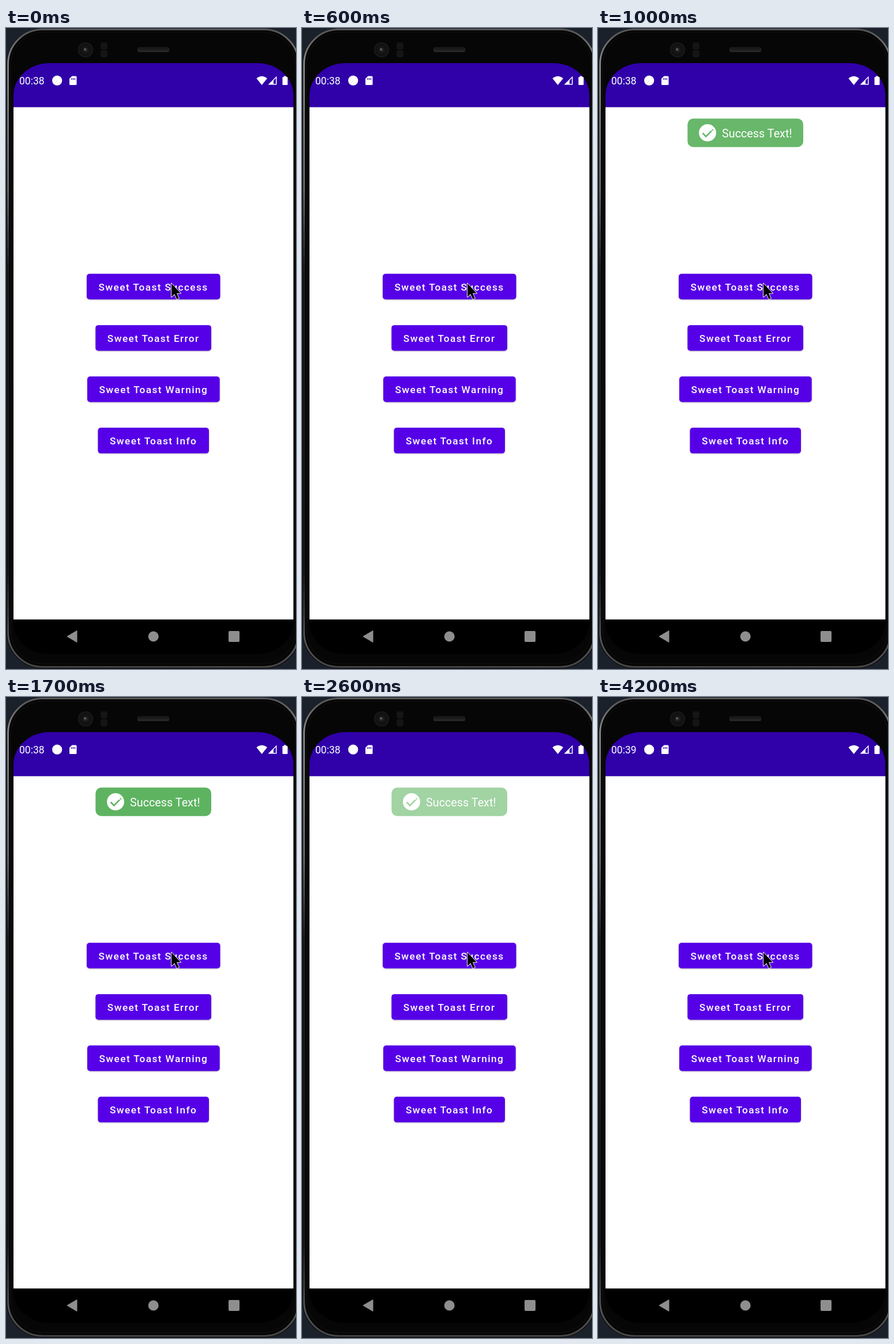
Write an HTML page that moves like this. It is 503 px wide and 1113 px high and loops after 4.8 s.

```html
<!DOCTYPE html>
<html lang="en">
<head>
<meta charset="utf-8">
<title>Toast demo</title>
<style>
  html, body { margin: 0; width: 100%; height: 100%; overflow: hidden; background: #1b212b; }
  svg { display: block; width: 503px; height: 1113px; font-family: Roboto, sans-serif; }
  text { fill: #fff; white-space: pre; }
  .button rect { fill: #5600e8; filter: drop-shadow(0 1.5px 1.2px #0004); }
  .button text { font-size: 17.3px; font-weight: 500; letter-spacing: 1.4px; }
</style>
</head>
<body>
<svg viewBox="0 0 503 1113">
  <defs>
    <linearGradient id="rim" x2="0" y2="1">
      <stop offset="0" stop-color="#555"/>
      <stop offset=".05" stop-color="#858585"/>
      <stop offset=".25" stop-color="#696969"/>
      <stop offset=".38" stop-color="#1c1c1c"/>
      <stop offset=".85" stop-color="#181818"/>
      <stop offset=".96" stop-color="#555"/>
      <stop offset="1" stop-color="#444"/>
    </linearGradient>
    <linearGradient id="grille" x2="0" y2="1">
      <stop stop-color="#111"/>
      <stop offset="1" stop-color="#2b2b2b"/>
    </linearGradient>
    <radialGradient id="lens">
      <stop stop-color="#39393d"/>
      <stop offset=".35" stop-color="#161618"/>
      <stop offset=".8" stop-color="#101011"/>
      <stop offset="1" stop-color="#202020"/>
    </radialGradient>
    <clipPath id="screen"><rect x="13" y="61" width="485.5" height="1026" rx="62" ry="56"/></clipPath>
  </defs>

  <!-- phone body -->
  <rect x="1" y="1" width="509" height="1111" rx="62" fill="#050505"/>
  <rect x="3.5" y="2.5" width="504" height="1107" rx="60" fill="#060606" stroke="url(#rim)" stroke-width="3"/>
  <rect x="8" y="7" width="495" height="1097" rx="58" fill="#070606" stroke="#141313"/>
  <circle cx="138" cy="38" r="13" fill="url(#lens)"/>
  <circle cx="137" cy="37" r="2" fill="#5b5b60"/>
  <rect x="164" y="25" width="12" height="12" rx="4" fill="#161515"/>
  <rect x="164" y="38" width="12" height="13" rx="4" fill="#161515"/>
  <rect x="228.500" y="34" width="54" height="7.500" rx="2" fill="url(#grille)" stroke="#242424"/>

  <!-- screen -->
  <g clip-path="url(#screen)">
    <rect x="13" y="61" width="486" height="1026"/>
    <rect x="13" y="61" width="486" height="77" fill="#3000a9"/>
    <rect x="13" y="137.500" width="486" height="889.500" fill="#fff"/>
  </g>

  <!-- status bar -->
  <text id="clock" x="23" y="98" font-size="17.5">00:38</text>
  <g fill="#fff">
    <circle cx="88.700" cy="91.200" r="8.600"/>
    <path d="M114.500 83.500H121Q122.500 83.500 122.500 85V97.500Q122.500 99 121 99H111.500Q110 99 110 97.500V88Z"/>
    <path d="M434.500 87.500Q443.700 80 453 87.500L443.700 99Z"/>
    <path d="M469.500 83.500V98.500H454.500Z"/>
    <path d="M482 83.500H486V85H487.300Q488.500 85 488.500 86.200V97.800Q488.500 99 487.300 99H480.700Q479.500 99 479.500 97.800V86.200Q479.500 85 480.700 85H482Z"/>
  </g>
  <path d="M114 87v3M116.700 87v3M119.400 87v3" stroke="#3000a9" stroke-width="1.300"/>
  <path d="M464 91L468 87V97H464Z" fill="#3000a9"/>

  <!-- navigation bar -->
  <g fill="#8e8e8e">
    <path d="M106 1056.500L123 1046.500V1066.500Z" stroke="#8e8e8e" stroke-linejoin="round"/>
    <circle cx="255.700" cy="1056.500" r="9"/>
    <rect x="386" y="1047" width="19" height="19" rx="2"/>
  </g>

  <g id="buttons"></g>

  <g id="toast" opacity="0">
    <rect x="155.300" y="157.300" width="200.700" height="49.500" rx="10" fill="#5eb361"/>
    <circle cx="190" cy="182" r="15" fill="#fff"/>
    <path d="M181.500 182.500L187.300 188.300L197 178.600M198 177.600L199.500 176.100" fill="none" stroke="#5eb361" stroke-width="2.600"/>
    <text x="215" y="190.300" font-size="19.8">Success Text!</text>
  </g>

  <!-- pointer -->
  <path d="M287 443.500V467L292.300 462L296.300 471L300 469.300L296 460.500H303Z"
        stroke="#fff" stroke-width="1.800" stroke-linejoin="round" paint-order="stroke"/>
</svg>
<script>
  const LOOP = 4800, STEP = 100, FADE = 400;
  const byId = id => document.getElementById(id);
  const clock = byId('clock'), toast = byId('toast');

  const buttons = [
    ['Success', 140, 231.5],
    ['Error', 155.3, 200.7],
    ['Warning', 141, 229.7],
    ['Info', 159.5, 192.5]
  ];
  byId('buttons').innerHTML = buttons.map(([kind, x, width], i) => {
    const y = 426.8 + i * 89.1;
    return `<g class="button"><rect x="${x}" y="${y}" width="${width}" height="44.5" rx="5"/>
      <text x="${x + 20.5}" y="${y + 29}">Sweet Toast ${kind}</text></g>`;
  }).join('');

  // Quadratic ease-out on entry, ease-in on exit.
  function toastOpacity(t) {
    if (t < 700 || t >= 2700) return 0;
    const enter = Math.min(1, (t - 700) / FADE);
    const exit = Math.max(0, (t - 2340) / FADE);
    return 1 - (1 - enter) ** 2 - exit ** 2;
  }

  const start = performance.now();
  function draw() {
    const elapsed = (performance.now() - start) % LOOP;
    const t = Math.floor(elapsed / STEP) * STEP;
    toast.setAttribute('opacity', toastOpacity(t));
    clock.textContent = t < 3800 ? '00:38' : '00:39';
    requestAnimationFrame(draw);
  }
  draw();
</script>
</body>
</html>
```
